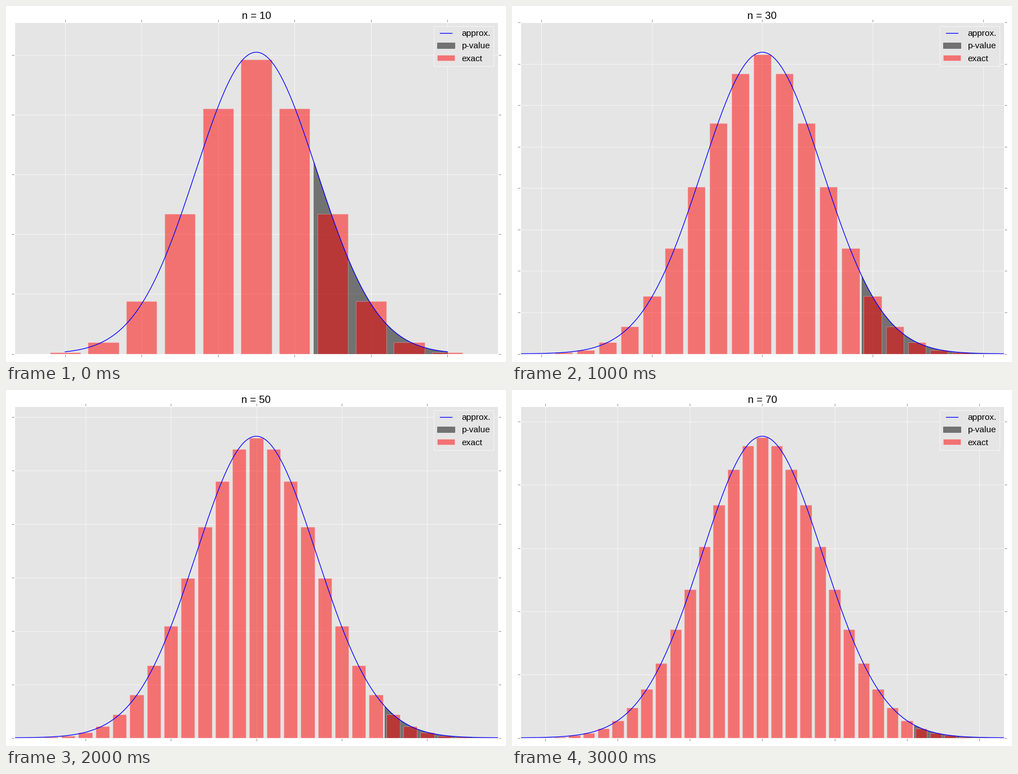
A matplotlib script that plays this animation: 886x632 px, repeating every 4000 ms.

```python
import math

import matplotlib.pyplot as plt
import numpy as np
from matplotlib.animation import FuncAnimation
from matplotlib.patches import Rectangle

W, H, DPI = 886, 632, 64
LEFT, RIGHT, TOP, BOTTOM = 15, 872, 28.5, 617.5
SIZES = (10, 30, 50, 70)
GREY = "#E5E5E5"
THIN, MEDIUM = 0.64, 1.28  # line widths in pixels

plt.rcParams["font.family"] = "Liberation Sans"


def pt(pixels):
    return pixels * 72 / DPI


BAR_STYLE = dict(facecolor="red", edgecolor="#EEEEEE", alpha=0.5, linewidth=pt(THIN))
TAIL_STYLE = dict(facecolor="black", edgecolor="black", alpha=0.5, linewidth=pt(THIN))
CURVE_STYLE = dict(color="blue", linewidth=pt(MEDIUM))

fig = plt.figure(figsize=(W / DPI, H / DPI), dpi=DPI, facecolor="white")
ax = fig.add_axes([LEFT / W, 1 - BOTTOM / H, (RIGHT - LEFT) / W, (BOTTOM - TOP) / H])

# Overlay in pixel coordinates for the title and the legend
overlay = fig.add_axes([0, 0, 1, 1], zorder=2)
overlay.set(xlim=(0, W), ylim=(H, 0))
overlay.axis("off")
title = overlay.text((LEFT + RIGHT) / 2, 23, "", fontsize=pt(18.5),
                     ha="center", va="baseline")


def draw_legend():
    overlay.add_patch(Rectangle((758, 36), 106.5, 70.5, facecolor=GREY,
                                edgecolor="white", linewidth=pt(THIN)))
    for label, baseline in (("approx.", 53.5), ("p-value", 75.5), ("exact", 97.5)):
        overlay.text(807.2, baseline, label, fontsize=pt(15.36), va="baseline")
    overlay.plot([769, 790.5], [48.2, 48.2], **CURVE_STYLE)
    overlay.add_patch(Rectangle((764.5, 64.8), 31, 10.7, **TAIL_STYLE))
    overlay.add_patch(Rectangle((764.5, 86.8), 31, 10.7, **BAR_STYLE))


def draw(frame):
    n = SIZES[frame]
    mean, sd = n / 2, math.sqrt(n) / 2
    peak = 1 / (sd * math.sqrt(2 * math.pi))

    def density(x):
        return peak * np.exp(-((x - mean) / sd) ** 2 / 2)

    ax.clear()
    ax.set_facecolor(GREY)
    ax.set_axisbelow(True)
    ax.grid(color="white", linestyle="-", linewidth=pt(THIN))
    ax.tick_params(direction="out", length=pt(5), width=pt(THIN), color="#555555",
                   top=True, right=True, labelbottom=False, labelleft=False)
    for spine in ax.spines.values():
        spine.set(color="white", linewidth=pt(MEDIUM))

    x = np.linspace(0, n, 1000)
    tail = np.linspace(0.65 * n, n, 500)
    counts = np.arange(n + 1)
    exact = [math.comb(n, int(k)) / 2 ** n for k in counts]
    ax.fill_between(tail, density(tail), **TAIL_STYLE)
    ax.bar(counts, exact, width=0.8, **BAR_STYLE)
    ax.plot(x, density(x), **CURVE_STYLE)

    ax.set_xticks(np.arange(0, n + 1, 2 if n == 10 else 5))
    ax.set_yticks(np.arange(0, 1.1 * peak, 0.05 if n == 10 else 0.02))
    ax.set_xlim(mean - 4 * sd, mean + 4 * sd)
    ax.set_ylim(0, 1.1 * peak)
    title.set_text(f"n = {n}")
    return []


draw_legend()
anim = FuncAnimation(fig, draw, frames=len(SIZES), interval=1000,
                     init_func=lambda: draw(0), repeat=True, repeat_delay=0)
plt.show()
```
